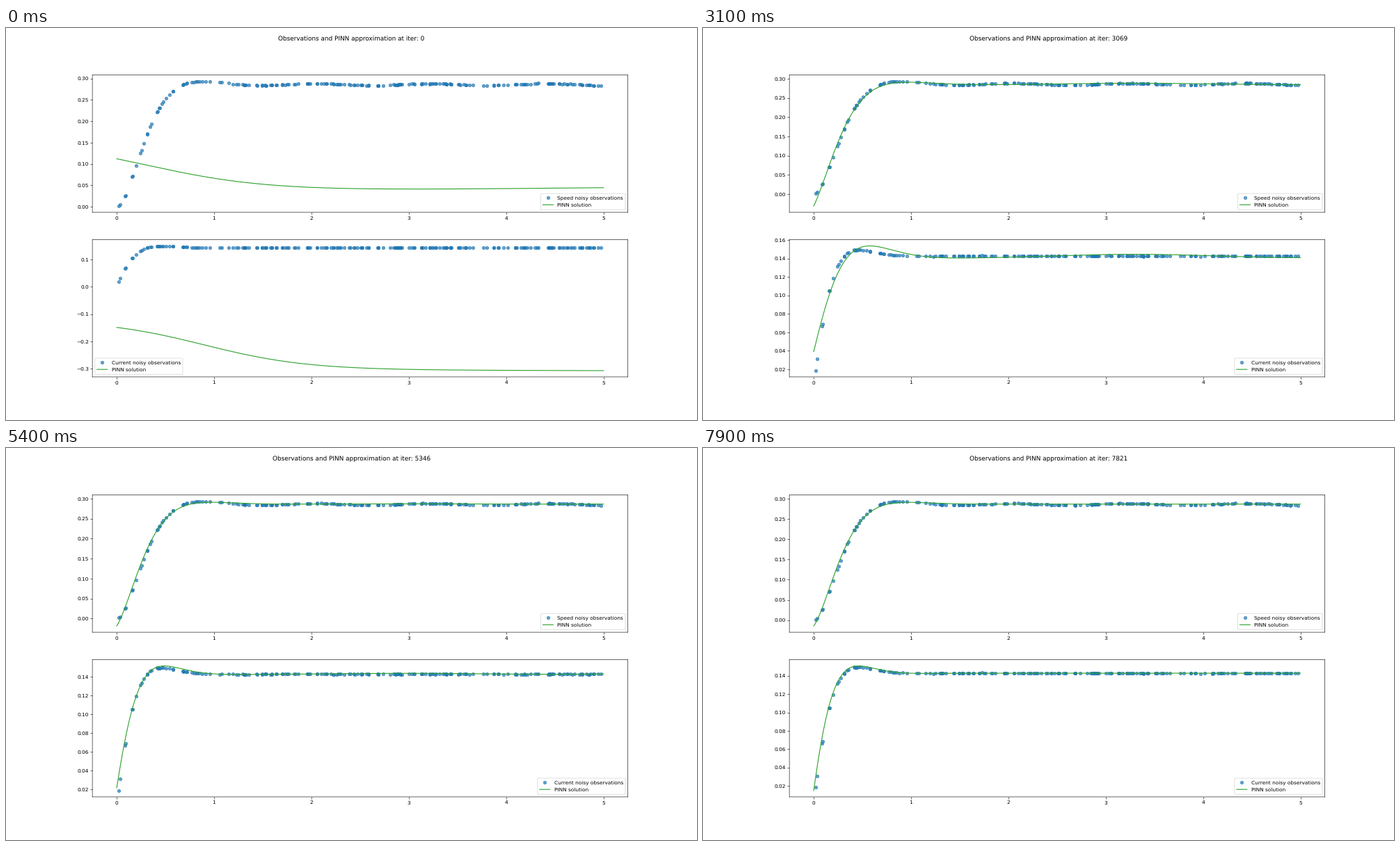
Write a matplotlib script that moves like this. It is 993x564 px and loops after 8 s.

```python
import numpy as np
import matplotlib.pyplot as plt
from matplotlib.animation import FuncAnimation

W, H, DPI = 993, 564, 53.59
FRAMES, STEP_MS, ITERS = 80, 100, 99

plt.rcParams.update({"text.hinting": "none", "path.snap": False})

# Training stages; each row is (start, damping, frequency, first crossing,
# ripple size, ripple frequency) of the network's step response.
STAGE_AT = np.array([1, 12, 31, 79])
SPEED_STAGES = np.array([
    (.17, 1.4, 1.3, 1.2, 0, .8),
    (-.0105, 3.0, 2.5, .80, .0045, 1.2),
    (-.031, 3.9, 2.9, .77, .0018, 1.9),
    (-.0145, 4.2, 3.1, .76, 0, 2.2)])
CURRENT_STAGES = np.array([
    (.115, 1.4, 1.3, 1.2, 0, .8),
    (.071, 2.35, 2.4, .57, .0027, 1.2),
    (.039, 3.5, 3.8, .37, .0018, 1.9),
    (.0148, 5.18, 4.6, .303, 0, 2.2)])

grid = np.linspace(0, 5, 500)


def ring(t, damping, freq, cross):
    """Damped oscillation: 1 at t = 0, first zero at t = cross."""
    return np.exp(-damping * t) * np.sin(freq * (cross - t)) / np.sin(freq * cross)


def drop(t, rate, mid):
    return 1 / (1 + np.exp(rate * (t - mid)))


def ease(u):
    return (1 - np.exp(-2.2 * u)) / (1 - np.exp(-2.2))


def stage(rows, frame):
    i = np.clip(np.searchsorted(STAGE_AT, frame, side="right") - 1, 0, len(rows) - 2)
    u = max(frame - STAGE_AT[i], 0) / (STAGE_AT[i + 1] - STAGE_AT[i])
    return rows[i] + ease(u) * (rows[i + 1] - rows[i])


# Measurements: a few isolated times on the rise, then a random spread.
rng = np.random.default_rng(7)
rise_t = [.021, .037, .087, .091, .16, .162, .199, .242, .253, .275, .311, .313,
          .344, .357, .417, .419, .438, .441, .464, .481, .505, .54, .577, .581]
obs_t = np.concatenate([rise_t, rng.uniform(.66, 4.99, 170)])
speed_obs = (.286 * (1 - ring(obs_t, 4.45, 3.5, .71))
             * (1 + .008 * np.sin(5.28 * (obs_t - 1.74)))
             + rng.normal(0, .0004, obs_t.size))
current_obs = (.1428 * (1 - ring(obs_t, 5.7, 4.7, .313))
               + rng.normal(0, .0002, obs_t.size))

# Untrained network output
speed_start = .0325 + .0024 * grid + .129 * drop(grid, 1.6, .3)
current_start = -.304 - .0007 * grid + .183 * drop(grid, 1.9, .9)


class Panel:
    def __init__(self, ax, name, obs, start, rows, level):
        self.ax, self.obs, self.start = ax, obs, start
        self.rows, self.level = rows, level
        ax.scatter(obs_t, obs, color="C0", alpha=0.7,
                   label=f"{name} noisy observations")
        self.line, = ax.plot(grid, start, color="C2", label="PINN solution")
        ax.set_xlim(-0.25, 5.25)
        ax.legend(loc="best")

    def fit(self, frame):
        y0, damping, freq, cross, size, wave = stage(self.rows, frame)
        # the plateau drifts up for a moment late in training
        drift = .002 * np.exp(-((frame - 61) / 5) ** 2) * (1 - np.exp(-grid / .3))
        y = (self.level + drift + size * np.cos(wave * grid)
             - (self.level + size - y0) * ring(grid, damping, freq, cross))
        return y + np.exp(-3 * frame) * (self.start - y)

    def update(self, frame):
        y = self.fit(frame)
        self.line.set_ydata(y)
        lo, hi = min(y.min(), self.obs.min()), max(y.max(), self.obs.max())
        pad = 0.05 * (hi - lo)
        self.ax.set_ylim(lo - pad, hi + pad)


fig, (top, bottom) = plt.subplots(
    2, 1, figsize=((W + 1e-6) / DPI, (H + 1e-6) / DPI), dpi=DPI)
panels = [Panel(top, "Speed", speed_obs, speed_start, SPEED_STAGES, .2865),
          Panel(bottom, "Current", current_obs, current_start, CURRENT_STAGES, .1428)]
title = fig.suptitle("")


def update(frame):
    title.set_text(f"Observations and PINN approximation at iter: {frame * ITERS}")
    for panel in panels:
        panel.update(frame)


anim = FuncAnimation(fig, update, frames=FRAMES, interval=STEP_MS,
                     init_func=lambda: update(0), repeat=True, repeat_delay=0)
plt.show()
```
